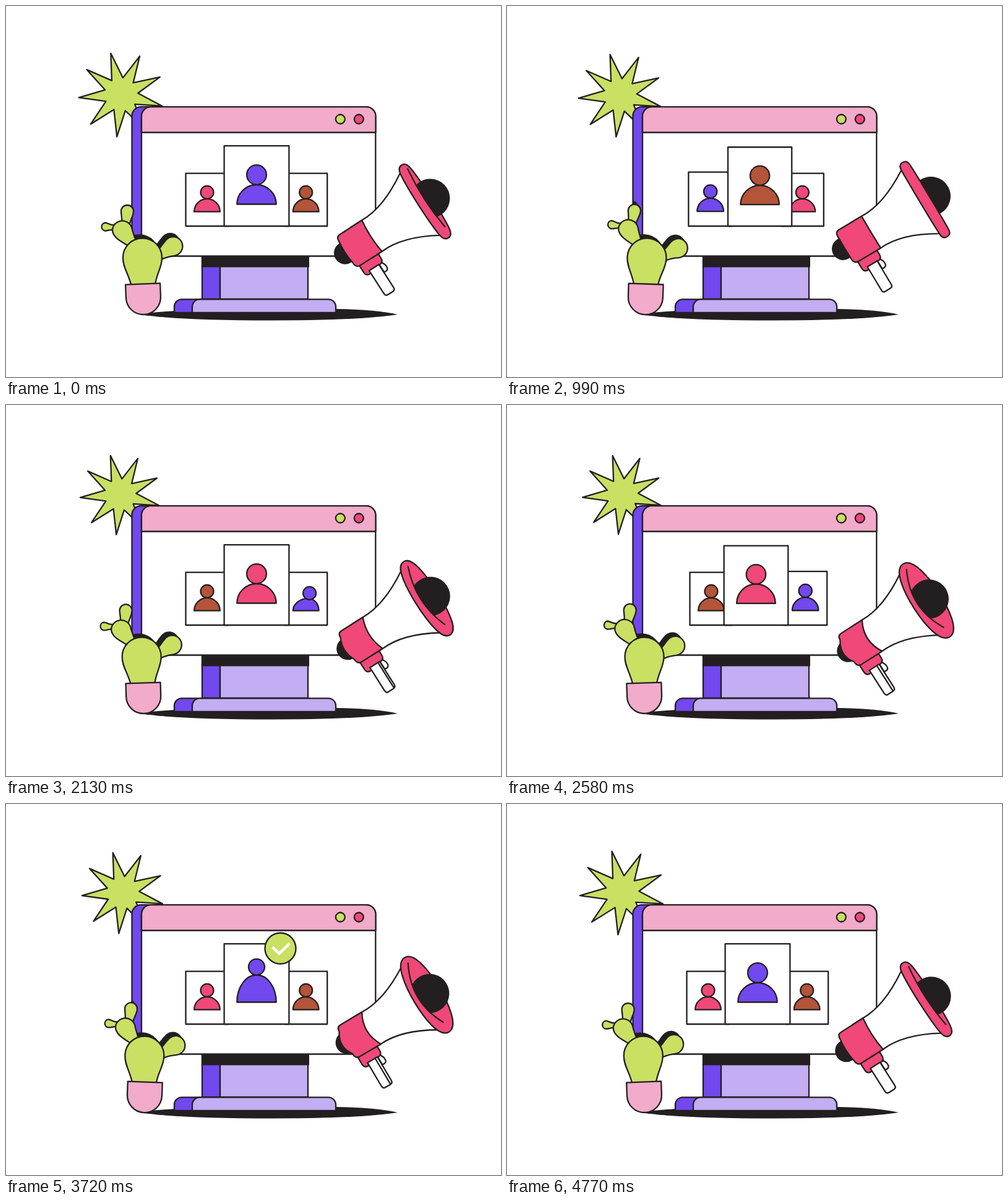
An HTML page that plays this animation: 800 by 600 pixels, repeating every 4.8 s.

```html
<!DOCTYPE html>
<html lang="en">
<head>
<meta charset="utf-8">
<title>Candidate pick</title>
<style>
  html, body { margin: 0; width: 100%; height: 100%; overflow: hidden; background: #fff; }
  svg { display: block; width: 800px; height: 600px; }
  .o { stroke: #231f20; stroke-width: 2.3; stroke-linejoin: round; stroke-linecap: round; }
  .ink { fill: #231f20; }
  .lime { fill: #c9e062; }
  .violet { fill: #7248ef; }
  .lilac { fill: #c3adf3; }
  .rose { fill: #f2abca; }
  .red { fill: #f04878; }
  .rust { fill: #b45438; }
  .white { fill: #fff; }
  .none { fill: none; }
</style>
</head>
<body>
<svg viewBox="0 0 800 600" xmlns="http://www.w3.org/2000/svg">
  <defs>
    <clipPath id="screenClip"><rect x="203" y="163" width="395" height="242"/></clipPath>
    <clipPath id="bellClip"><path id="bellEdge"/></clipPath>
    <g id="arms">
      <path d="M249 411C256 407 263 405 272 404A15.600 15.600 0 0 0 271 373C258 373 256 384 244 397Z"/>
      <path d="M187 350C188 342 186 338 186 332A10 10 0 0 1 206 332C206 339 202 344 200 352Z"/>
      <path d="M174 362C168 361 165 364 160 363.500A6.600 6.600 0 0 1 160 350.500C165 350.500 167 355 176 354Z"/>
      <path d="M198 388C186 381 172 374 172 362A16 16 0 0 1 203 358C205 367 207 371 210 380Z"/>
    </g>
    <path id="trunk" d="M203 454C198 432 189 424 189 407A31.500 31.500 0 0 1 252 407C252 424 243 432 240.500 454Z"/>
  </defs>

  <path id="star" class="o lime"/>
  <path class="ink" d="M216 498C270 491 350 490 430 490H535Q600 491 633 499Q570 508.500 430 508.500Q280 508.500 216 499Z"/>

  <g class="o">
    <path class="violet" d="M235 163.200H218A14.500 14.500 0 0 0 203.500 177.700V404.500H235Z"/>
    <path class="white" d="M219 404.500V178.200A15 15 0 0 1 234 163.200H582.300A15 15 0 0 1 597.300 178.200V404.500Z"/>
    <path class="rose" d="M219 204.500V178.200A15 15 0 0 1 234 163.200H582.500A15 15 0 0 1 597.500 178.200V204.500Z"/>
    <circle class="lime" cx="540.300" cy="183" r="7.500"/>
    <circle class="red" cx="570.300" cy="183" r="7.500"/>
    <path class="violet" d="M317 420H346V474H317Z"/>
    <path class="lilac" d="M346 420H488V474H346Z"/>
    <path class="violet" d="M272 496V486.300A12 12 0 0 1 284 474.300H315V496Z"/>
    <path class="lilac" d="M301 496V486.300A12 12 0 0 1 313 474.300H521A12 12 0 0 1 533 486.300V496Z"/>
  </g>
  <path class="ink" d="M315.800 404H490V422.500H315.800Z"/>

  <g id="cards"></g>
  <g id="badge">
    <circle class="o lime" r="25"/>
    <path class="none" d="M-13 -2L-2 8.500L15 -8" stroke="#fff" stroke-width="4.500"/>
  </g>

  <g clip-path="url(#screenClip)">
    <g class="sway ink o">
      <use href="#arms" x="-5" y="-5"/><use href="#trunk" x="-5" y="-5"/>
    </g>
  </g>
  <g class="sway lime o"><use href="#arms"/><use href="#trunk"/></g>
  <path id="pot" class="o rose" d="M195 449.500H251V471A28 28 0 0 1 195 471Z"/>

  <g id="horn" class="o">
    <circle id="knob" class="ink" r="17"/>
    <path class="white" d="M-15 42L-10 41L-9 47Q-6 51 -7 57Q-8 61 -15 60Z"/>
    <path class="red" d="M-43 28V42Q-43 50 -36 50H-30L-15 46Q-7 46 -7 38V28Z"/>
    <path class="white" d="M-34 45H-15.500V89Q-15.500 94 -20 94H-30Q-34 94 -34 89Z"/>
    <path id="grip" class="none"/>
    <path class="white" d="M-20 -30H0Q40 -28 92 -60H101V58H92Q40 27 0 30H-20Z"/>
    <path id="back" class="red"/>
    <ellipse class="rim ink" style="stroke-width:18.300px"/>
    <ellipse class="rim red" style="stroke:#f04878;stroke-width:13.700px"/>
    <path id="lip" class="none"/>
    <g clip-path="url(#bellClip)"><circle id="ball" class="ink" r="30.500"/></g>
  </g>
</svg>

<script>
const LOOP = 4800, NS = 'http://www.w3.org/2000/svg';
const $ = id => document.getElementById(id);
const set = (el, attrs) => { for (const k in attrs) el.setAttribute(k, attrs[k]); };
const clamp = x => Math.max(0, Math.min(1, x));
const smooth = x => { x = clamp(x); return x * x * (3 - 2 * x); };
const mix = (a, b, p) => a + (b - a) * p;
const wave = (t, peak, period) => Math.cos(2 * Math.PI * (t - peak) / period);
const bump = (t, mid, half) => Math.abs(t - mid) < half ? (1 + Math.cos(Math.PI * (t - mid) / half)) / 2 : 0;
const backOut = x => { const y = clamp(x) - 1; return 1 + 2.7 * y ** 3 + 1.7 * y ** 2; };

// Slots: 0 centre, 1 left, 2 right; every step moves each card one slot on.
const slotX = [405, 325, 484.7], slotScale = [1, 0.658, 0.658];
const FIRST = 546, PERIOD = 990, MOVE = 510;

function add(parent, tag, cls) {
  const el = document.createElementNS(NS, tag);
  el.setAttribute('class', cls);
  return parent.appendChild(el);
}

const cards = ['violet', 'red', 'rust'].map((color, slot) => {
  const g = add($('cards'), 'g', 'o');
  return { g, slot, z: 0, box: add(g, 'rect', 'white'), body: add(g, 'path', color), head: add(g, 'circle', color) };
});
let stack = '';

function drawCard(c, step, p, lean, rise) {
  const a = (c.slot + step) % 3, b = (a + 1) % 3;
  const x = mix(slotX[a], slotX[b], p), s = mix(slotScale[a], slotScale[b], p);
  c.z = a === 1 ? 0 : (a === 0) === (p < 0.5) ? 2 : 1;
  set(c.box, { x: x - 52.4 * s, y: 356 - 129.8 * s, width: 104.8 * s, height: 129.8 * s });
  const at = (dx, dy) => (x + dx * s).toFixed(2) + ' ' + (356 - dy * s).toFixed(2) + ' ';
  const base = 35.5, h = 31.5 + 12.5 * rise - 1.5 * lean, top = base + h, tip = 4 * lean;
  set(c.body, { d: 'M' + at(-31.7, base) + 'C' + at(-31.7, base + h * 0.55) + at(tip - 17.5, top) + at(tip, top) +
    'C' + at(tip + 17.5, top) + at(31.7, base + h * 0.55) + at(31.7, base) + 'Z' });
  set(c.head, { cx: x + 9 * lean * s, cy: 356 - (83 + 9.4 * rise - 4.5 * lean) * s, r: (15.9 - 2.9 * rise) * s });
}

function drawCards(t) {
  let total = 0;
  for (let i = 0; i < 3; i++) total += smooth((t - FIRST - i * PERIOD) / MOVE);
  const step = Math.floor(total), p = total - step;
  cards.forEach((c, i) => drawCard(c, step, p, i ? 0 : bump(t, 2130, 200), i ? 0 : bump(t, 3720, 320)));
  const order = [...cards].sort((a, b) => a.z - b.z);
  const key = order.map(c => c.slot).join('');
  if (key !== stack) {
    order.forEach(c => $('cards').appendChild(c.g));
    stack = key;
  }
  const k = t < 3900 ? backOut((t - 3150) / 330) : 1 - smooth((t - 4300) / 240);
  set($('badge'), { transform: `translate(443.5 233.5) scale(${Math.max(0, k)})`, visibility: k > 0.01 ? 'visible' : 'hidden' });
}

function drawStar(t) {
  const R = 66.7 + 2.1 * wave(t, 220, LOOP);
  const cx = 186 + 3 * wave(t, 3650, LOOP), cy = 143.9 + wave(t, 2000, LOOP);
  let d = '';
  for (let i = 0; i < 18; i++) {
    const a = (104.2 + 20 * i) * Math.PI / 180, r = i % 2 ? R * 0.394 : R;
    d += (i ? 'L' : 'M') + (cx + r * Math.cos(a)).toFixed(2) + ' ' + (cy - r * Math.sin(a)).toFixed(2);
  }
  set($('star'), { d: d + 'Z' });
}

const swayers = document.querySelectorAll('.sway');
function drawCactus(t) {
  const lean = 2.2 * (wave(t, 850, 2400) - wave(0, 850, 2400));
  swayers.forEach(el => set(el, { transform: `rotate(${lean} 222 499)` }));
  set($('pot'), { transform: `rotate(${2.2 * wave(t, 1200, 2400)} 222 499)` });
}

const rims = document.querySelectorAll('.rim');
function drawHorn(t) {
  const x = 590.5 + 2.7 * wave(t, 1920, 2400);
  const y = 367.5 - 5.5 * wave(t, 1460, 2400);
  const turn = 58.3 + wave(t, 1250, 2400) - 90;
  const open = 0.5 - 0.5 * wave(t, 720, LOOP);
  set($('horn'), { transform: `translate(${x} ${y}) rotate(${turn})` });

  const rear = -50 + 3 * open;
  set($('knob'), { cx: -53 + 8 * open });
  set($('back'), { d: `M0 -30L${rear + 7} -30Q${rear} -30 ${rear} -22Q${-50 - 14 * open} 0 ${rear} 20Q${rear} 30 ${rear + 8} 30L0 30Q${-20 * open} 0 0 -30Z` });
  set($('grip'), { d: `M${-15.5 - 5 * open} 46V93`, visibility: open > 0.3 ? 'visible' : 'hidden' });

  const mid = 101.5 + 3.5 * open, rx = 0.3 + 17.5 * open;
  rims.forEach(el => set(el, { cx: mid, cy: -0.5, rx, ry: 62 }));

  // The near lip hides part of the ball; edge-on, the whole rim does.
  const edge = 108 - 4 * open, bend = edge - 34 * open, front = open > 0.1;
  const shut = mid + rx + 8;
  set($('lip'), { d: `M${edge} -60Q${bend} -4 ${edge} 51`, visibility: front ? 'visible' : 'hidden' });
  set($('bellEdge'), { d: front ? `M${edge} -60Q${bend} -4 ${edge} 51H180V-60Z` : `M${shut} -60V60H180V-60Z` });
  set($('ball'), { cx: 113 - 4 * open });
}

function draw(t) {
  drawStar(t);
  drawCards(t);
  drawCactus(t);
  drawHorn(t);
}

let start = null;
function tick(now) {
  if (start === null) start = now;
  draw((now - start) % LOOP);
  requestAnimationFrame(tick);
}
draw(0);
requestAnimationFrame(tick);
</script>
</body>
</html>
```
